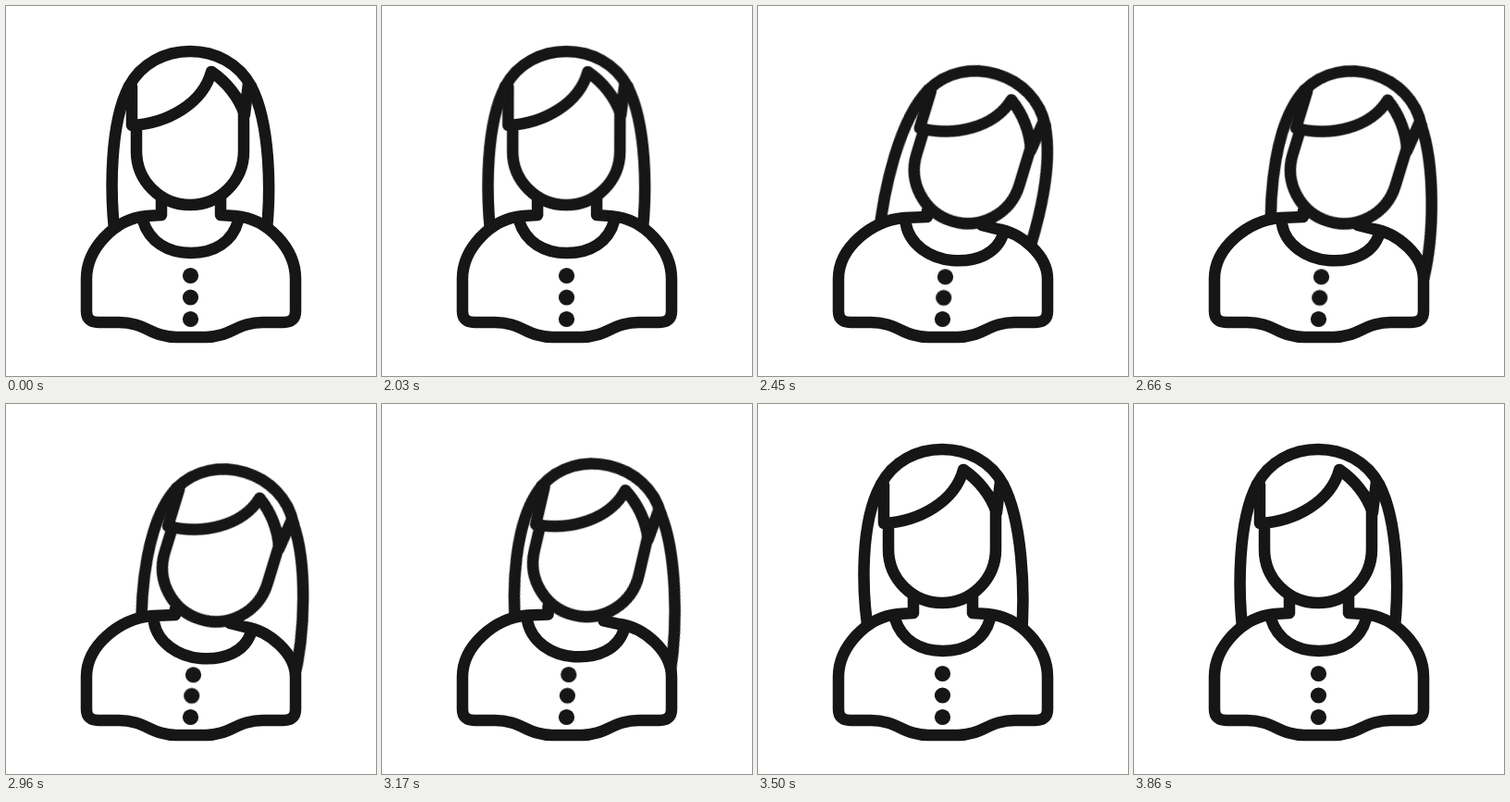
Animation of 400x400 px, one loop 3.89 s. Source, as an HTML page:

```html
<!DOCTYPE html>
<html lang="en">
<head>
<meta charset="utf-8">
<title>Tilting head</title>
<style>
html, body { margin: 0; width: 100%; height: 100%; overflow: hidden; background: #fff; }
svg { display: block; width: 100vw; height: 100vh; }
path { fill: none; stroke: #161616; stroke-width: 12.5; stroke-linecap: round; stroke-linejoin: round; }
circle { fill: #161616; }
.skin { fill: #fff; }

.tilt, .torso, .collar, .button, .strand { animation: 3.89s linear infinite; }
.tilt { animation-name: tilt; transform-origin: 149px 264px; }
.torso { animation-name: torso; }
.collar { animation-name: collar; }
.button { animation-name: shift; }
.left { animation-name: left; }
.right { animation-name: right; }

/* The lean: out from 2000 to 2480 ms, back from 3030 to 3455 ms */
@keyframes tilt {
  0%, 51.41% { transform: translate(0, 0) rotate(0deg); animation-timing-function: ease-in-out; }
  63.75%, 77.89% { transform: translate(-1px, 1px) rotate(17deg); animation-timing-function: ease-in-out; }
  88.82%, 100% { transform: translate(0, 0) rotate(0deg); }
}
@keyframes torso {
  0%, 51.41%, 88.82%, 100% {
    d: path("M168 208 L168 226 L152 227 C117 230 87 263 87 295 L87 330 Q87 342 100 342 L122 342 C150 342 158 358 184 358 L216 358 C242 358 250 342 278 342 L300 342 Q313 342 313 330 L313 295 C313 263 284 230 248 227 L232 226 L232 208");
    animation-timing-function: ease-in-out;
  }
  63.75%, 77.89% {
    d: path("M183 222 L183 228 L158 229 C123 232 87 261 87 295 L87 330 Q87 342 100 342 L122 342 C150 342 158 358 184 358 L216 358 C242 358 250 342 278 342 L300 342 Q313 342 313 330 L313 295 C313 270 285 245 258 241 L242 237 L246 225");
    animation-timing-function: ease-in-out;
  }
}
@keyframes collar {
  0%, 51.41%, 88.82%, 100% {
    d: path("M148 232 C155 255 175 267 200 267 C225 267 245 255 251 232");
    animation-timing-function: ease-in-out;
  }
  63.75%, 77.89% {
    d: path("M160 236 C164 258 186 273 210 275 C236 277 258 268 265 247");
    animation-timing-function: ease-in-out;
  }
}
@keyframes shift {
  0%, 51.41%, 88.82%, 100% { transform: none; animation-timing-function: ease-in-out; }
  63.75%, 77.89% { transform: translate(var(--dx), var(--dy)); animation-timing-function: ease-in-out; }
}

/* The loose hair trails the head, swings past and settles */
@keyframes left {
  0%, 51.41% { d: path("M119 258 C111 200 113 125 133 87"); animation-timing-function: ease-in-out; }
  58.35% { d: path("M113 258 C105 200 110 125 133 87"); animation-timing-function: ease-in; }
  62.98% { d: path("M128 256 C118 205 112 127 133 87"); animation-timing-function: ease-out; }
  69.9% { d: path("M147 252 C130 205 112 130 133 87"); animation-timing-function: ease-in-out; }
  76.1%, 78.7% { d: path("M144 252 C128 205 112 130 133 87"); animation-timing-function: ease-in; }
  84.58% { d: path("M141 252 C124 205 111 130 133 87"); animation-timing-function: ease-out; }
  93.83% { d: path("M115 258 C107 200 111 125 133 87"); animation-timing-function: ease-in-out; }
  99.2%, 100% { d: path("M119 258 C111 200 113 125 133 87"); }
}
@keyframes right {
  0%, 51.41% { d: path("M280 258 C288 200 285 125 265 87"); animation-timing-function: ease-in-out; }
  58.35% { d: path("M276 245 C283 195 283 125 265 87"); animation-timing-function: ease-in; }
  62.98% { d: path("M287 235 C289 185 285 125 265 87"); animation-timing-function: ease-out; }
  69.9% { d: path("M318 247 C315 195 291 122 265 87"); animation-timing-function: ease-in-out; }
  76.1%, 78.7% { d: path("M315 250 C312 195 291 122 265 87"); animation-timing-function: ease-in; }
  84.58% { d: path("M312 262 C306 200 288 122 265 87"); animation-timing-function: ease-out; }
  93.83% { d: path("M276 258 C285 200 284 125 265 87"); animation-timing-function: ease-in-out; }
  99.2%, 100% { d: path("M280 258 C288 200 285 125 265 87"); }
}
</style>
</head>
<body>
<svg viewBox="0 0 400 400">
  <g class="tilt">
    <path class="strand left"/>
    <path class="strand right"/>
  </g>

  <path class="torso skin"/>
  <path class="collar"/>
  <circle class="button" cx="199.5" cy="291.5" r="8.6" style="--dx: 3px; --dy: 1.3px"/>
  <circle class="button" cx="199.5" cy="315" r="8.6" style="--dx: 1.2px; --dy: .4px"/>
  <circle cx="199.5" cy="338.5" r="8.6"/>

  <g class="tilt">
    <path class="skin" d="M141 130 V157 A58 58 0 0 0 257 157 V114"/>
    <path d="M133 87 C146 62 172 49 199 49 C226 49 252 62 265 87"/>
    <path d="M136 88 V129 C175 127 213 105 222 71 C238 82 251 98 258 117 L262 84"/>
  </g>
</svg>
</body>
</html>
```
